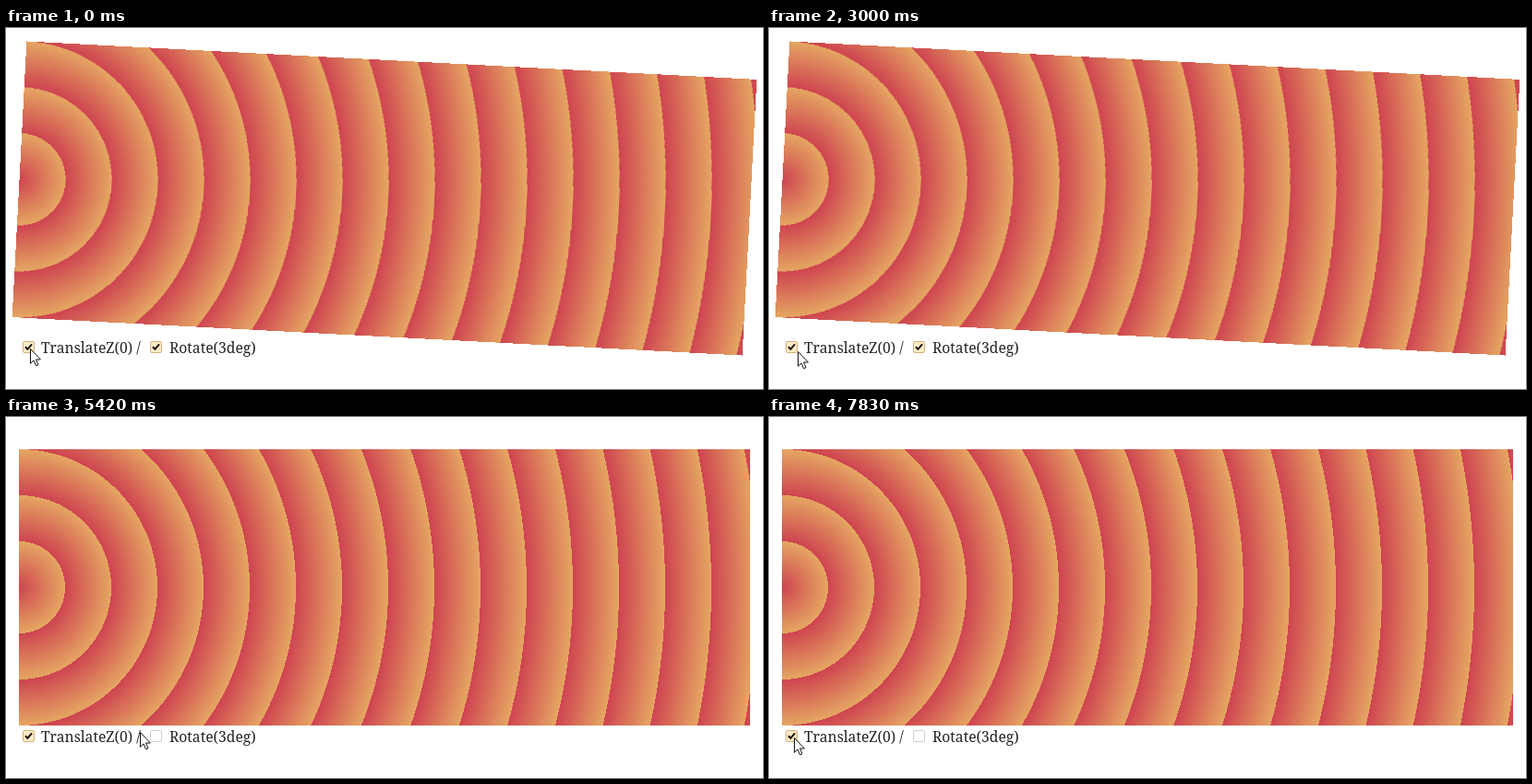
Animation, 820 px wide and 392 px high, one loop 8000 ms. Source, as an HTML page:

```html
<!DOCTYPE html>
<html lang="en">
<head>
<meta charset="utf-8">
<style>
  html, body { margin: 0; width: 100%; height: 100%; overflow: hidden; background: #fff; }
  #panel {
    position: absolute; left: 14px; top: 35px; width: 792px; height: 300px;
    background: repeating-radial-gradient(circle at 0 50%, #ce4450, #e5a662 50px);
  }
  svg { position: absolute; left: 0; top: 0; }
  text { font: 15.7px "Noto Serif", serif; fill: #24242a; }
  .box rect { fill: #fff; stroke: #cfcfcf; }
  .box path { fill: none; stroke: #17130c; stroke-width: 2; visibility: hidden; }
  .box.on rect { fill: #fdebc8; stroke: #d2b27c; }
  .box.on path { visibility: visible; }
</style>
</head>
<body>
<div id="panel"></div>
<svg width="820" height="392" viewBox="0 0 820 392">
  <g class="box" id="layerBox" transform="translate(18 340)">
    <rect x=".5" y=".5" width="12" height="12" rx="1.5"/>
    <path d="M3 6.2 5.4 8.8 10 3.4"/>
  </g>
  <text x="38" y="353">TranslateZ(0) /</text>
  <g class="box" id="rotateBox" transform="translate(156 340)">
    <rect x=".5" y=".5" width="12" height="12" rx="1.5"/>
    <path d="M3 6.2 5.4 8.8 10 3.4"/>
  </g>
  <text x="177" y="353">Rotate(3deg)</text>
  <path id="cursor" d="M.5 .5V16.3L4 12.9 6.5 18.8 9 17.7 6.5 12H11.4Z" fill="#fff" stroke="#111"/>
</svg>
<script>
const LOOP = 8000;
const byId = id => document.getElementById(id);
const panel = byId('panel'), cursor = byId('cursor');
const layerBox = byId('layerBox'), rotateBox = byId('rotateBox');

// The pointer takes a fixed number of discrete steps along an arc.
const moves = [
  { start: 3000, end: 3330, steps: 9, from: [26, 348], to: [163, 344], sag: 8 },
  { start: 5330, end: 5830, steps: 13, from: [163, 344], to: [27, 348], sag: -4 }
];
const ease = p => p * p * (3 - 2 * p);

function pointerAt(t) {
  const move = t < moves[1].start ? moves[0] : moves[1];
  const { start, end, steps, from, to, sag } = move;
  if (t < start) return from;
  const step = Math.floor((t - start) / (end - start) * (steps - 1)) + 1;
  const p = Math.min(1, step / steps), e = ease(p);
  return [
    Math.round(from[0] + (to[0] - from[0]) * e),
    Math.round(from[1] + (to[1] - from[1]) * e + sag * Math.sin(Math.PI * p))
  ];
}

function draw(t) {
  const layered = !(t >= 1000 && t < 2000 || t >= 6830 && t < 7830);
  const rotated = t < 4330;
  layerBox.classList.toggle('on', layered);
  rotateBox.classList.toggle('on', rotated);
  panel.style.transform =
    `${layered ? 'translateZ(0) ' : ''}rotate(${rotated ? 3 : 0}deg)`;
  cursor.setAttribute('transform', `translate(${pointerAt(t)})`);
}

function frame() {
  draw(performance.now() % LOOP);
  requestAnimationFrame(frame);
}
frame();
</script>
</body>
</html>
```
